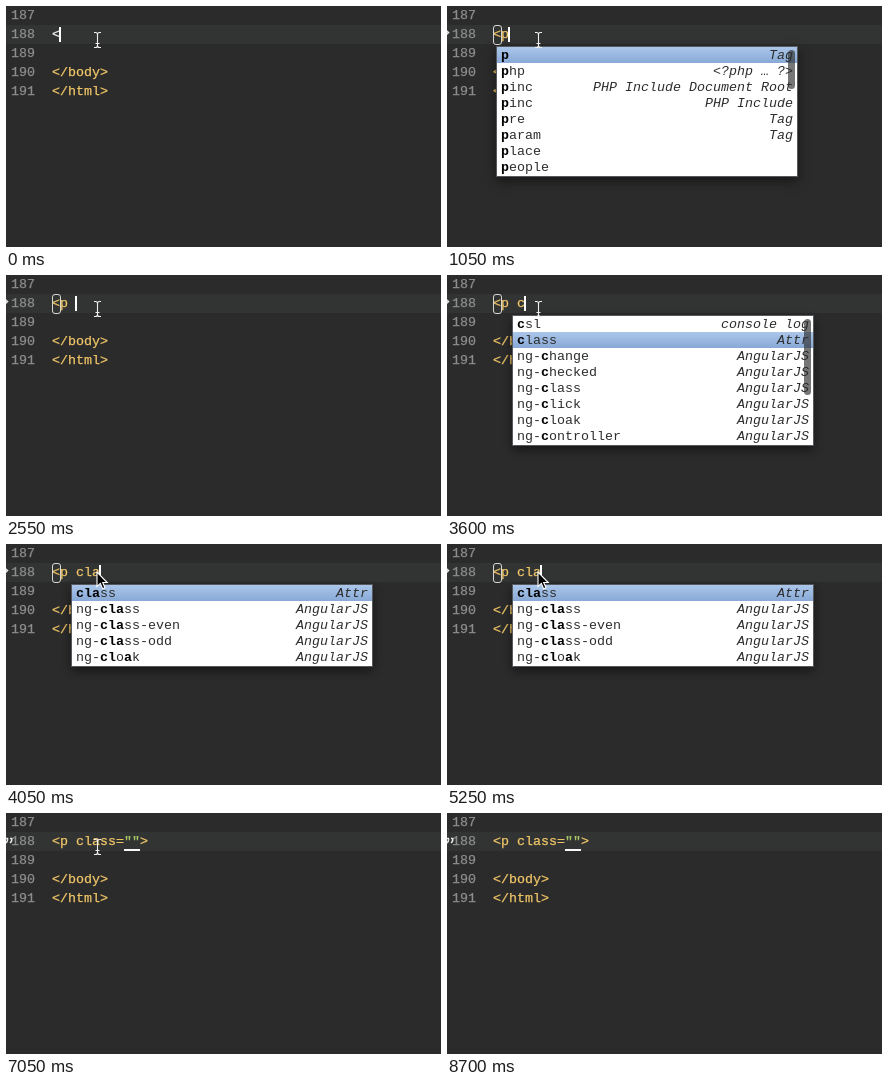
These frames come from a looping animation (435x241 px, 8790 ms). An HTML page with a canvas:

```html
<!DOCTYPE html>
<html lang="en">
<head>
<meta charset="utf-8">
<title>Editor autocompletion</title>
<style>
html, body { margin: 0; width: 100%; height: 100%; overflow: hidden; background: #2b2b2b; }
canvas { display: block; }
</style>
</head>
<body>
<canvas id="stage" width="435" height="241"></canvas>
<script>
const ctx = document.getElementById('stage').getContext('2d');
const LOOP = 8790, STEP = 150, CHAR = 8, LINE = 19, ROW = 16, LEFT = 46;
const YELLOW = '#f2c768', GREEN = '#a9c764', WHITE = '#f8f8f8';

const ng = names => names.split(' ').map(name => ['ng-' + name, 'AngularJS']);
const classRow = ['class', 'Attr'], logRow = ['csl', 'console log'];
const menus = {
  p: { x: 49, selected: 0, thumb: 39, rows: [
    ['p', 'Tag'], ['php', '<?php … ?>'], ['pinc', 'PHP Include Document Root'],
    ['pinc', 'PHP Include'], ['pre', 'Tag'], ['param', 'Tag'], ['place', ''], ['people', '']] },
  c: { x: 65, selected: 1, thumb: 76, rows: [
    logRow, classRow, ...ng('change checked class click cloak controller')] },
  cl: { x: 65, selected: 0, thumb: 76, rows: [
    classRow, logRow, ...ng('class click cloak class-even class-odd controller')] },
  cla: { x: 65, selected: 0, thumb: 0, rows: [
    classRow, ...ng('class class-even class-odd cloak')] }
};

// Each entry restarts the caret blink: time, text, caret column, open menu
const states = [
  [0, '<', 1], [1050, '<p', 2, 'p'], [2550, '<p ', 3], [3600, '<p c', 4, 'c'],
  [3750, '<p cl', 5, 'cl'], [4050, '<p cla', 6, 'cla'], [4200, '<p cla', 6, 'cla'],
  [5550, '<p class="">', 10]
];

function text(str, x, y, color, style = '', stroke = 0.25) {
  ctx.font = style + ' 13.333px "Liberation Mono", monospace';
  ctx.fillStyle = ctx.strokeStyle = color;
  ctx.lineWidth = stroke;
  [...str].forEach((ch, i) => {
    ctx.fillText(ch, x + i * CHAR, y);
    if (stroke) ctx.strokeText(ch, x + i * CHAR, y);
  });
}

function box(x, y, w, h, color) {
  ctx.fillStyle = color;
  ctx.fillRect(x, y, w, h);
}

function line(d, color, width) {
  ctx.strokeStyle = color;
  ctx.lineWidth = width;
  ctx.stroke(new Path2D(d));
}

function caretAlpha(age) {
  const phase = age % 1050;
  if (age >= 1050 && phase < 300 || phase < 300) return 1;
  return phase < 450 || phase >= 900 ? 0.5 : 0;
}

function drawMenu(query, t) {
  const { x, selected, thumb, rows } = menus[query];
  const y = 41, w = 302, h = rows.length * ROW + 1;
  ctx.save();
  ctx.shadowColor = 'rgba(0,0,0,.5)';
  ctx.shadowBlur = 10;
  ctx.shadowOffsetY = 4;
  box(x, y - 1, w, h + 2, '#55585c');
  ctx.restore();
  box(x + 1, y, w - 2, h, '#fff');

  const blue = ctx.createLinearGradient(0, y + selected * ROW, 0, y + selected * ROW + ROW);
  blue.addColorStop(0, '#abc6e9');
  blue.addColorStop(1, '#88a9d7');
  box(x + 1, y + selected * ROW, w - 2, ROW, blue);

  rows.forEach(([name, hint], i) => {
    const base = y + 12 + i * ROW;
    let matched = 0;
    [...name].forEach((ch, k) => {
      const hit = ch === query[matched];
      if (hit) matched++;
      text(ch, x + 5 + k * CHAR, base, hit ? '#000' : '#2d2d2d', hit ? 'bold' : '', 0);
    });
    text(hint, x + 297 - hint.length * CHAR, base, '#2d2d2d', 'italic', 0);
  });

  // The overlay scrollbar fades away once the list rests
  const fade = query === 'p' ? (t < 1500 ? 1 : t < 1650 ? 0.5 : 0) : 1;
  if (thumb && fade) {
    ctx.globalAlpha = fade;
    ctx.fillStyle = 'rgba(45,45,45,.65)';
    ctx.beginPath();
    ctx.roundRect(x + 292, y + 3, 7, thumb, 3.5);
    ctx.fill();
    ctx.globalAlpha = 1;
  }
}

function drawPointer(t) {
  if (t >= 8100) return;
  ctx.save();
  if (t >= 4050 && t < 5550) {
    ctx.translate(91, 28);
    const arrow = new Path2D('M0 0V14.5L3.3 11.4L5.6 16.8L8 15.8L5.7 10.5H10.2Z');
    ctx.fillStyle = '#000';
    ctx.fill(arrow);
    ctx.strokeStyle = '#fff';
    ctx.lineWidth = 1.1;
    ctx.stroke(arrow);
  } else {
    const [x, y] = t < 7800 ? [91, 34] : t < 7950 ? [118, 170] : [338, 230];
    ctx.translate(x + 0.5, y);
    line('M-3.5 -7.5H-2Q0 -7.5 0 -5.5V5.5Q0 7.5 -2 7.5H-3.5M3.5 -7.5H2Q0 -7.5 0 -5.5M0 5.5Q0 7.5 2 7.5H3.5M-2 3.5H2', '#f0f0f0', 1.1);
  }
  ctx.restore();
}

function draw(t) {
  const [start, typed, column, menu] = states.findLast(s => s[0] <= t);
  const inQuotes = t >= 5850;
  box(0, 0, 435, 241, '#2b2b2b');
  box(0, 19, 435, 19, '#323434');

  for (let i = 0; i < 5; i++) text(String(187 + i), 5, 13 + i * LINE, '#8c8c8c');
  text('</body>', LEFT, 13 + 3 * LINE, YELLOW);
  text('</html>', LEFT, 13 + 4 * LINE, YELLOW);
  [...typed].forEach((ch, i) => {
    const color = t < 1050 ? WHITE : ch === '"' ? GREEN : YELLOW;
    text(ch, LEFT + i * CHAR, 13 + LINE, color);
  });

  if (inQuotes) {
    box(118, 36, 16, 2, WHITE);
    line('M0 25.5H1.5Q2 28 0 30M4 25.5H5.5Q6.5 28 4 30', '#e8e8e8', 1.5);
  } else if (t >= 300) {
    ctx.beginPath();
    ctx.roundRect(46.5, 19.5, 8, 19, 2.5);
    ctx.strokeStyle = '#d8d8d2';
    ctx.lineWidth = 1;
    ctx.stroke();
    line('M-1 24.5L1.5 26.5L-1 29', '#e8e8e8', 1.5);
  }

  if (t < 8700) {
    ctx.globalAlpha = caretAlpha(t - start);
    box(LEFT + column * CHAR - 1, 21, 2, 15, '#fff');
    ctx.globalAlpha = 1;
  }
  if (menu) drawMenu(menu, t);
  drawPointer(t);
}

function tick() {
  const t = performance.now() % LOOP;
  draw(Math.floor(t / STEP) * STEP);
  requestAnimationFrame(tick);
}
tick();
</script>
</body>
</html>
```
